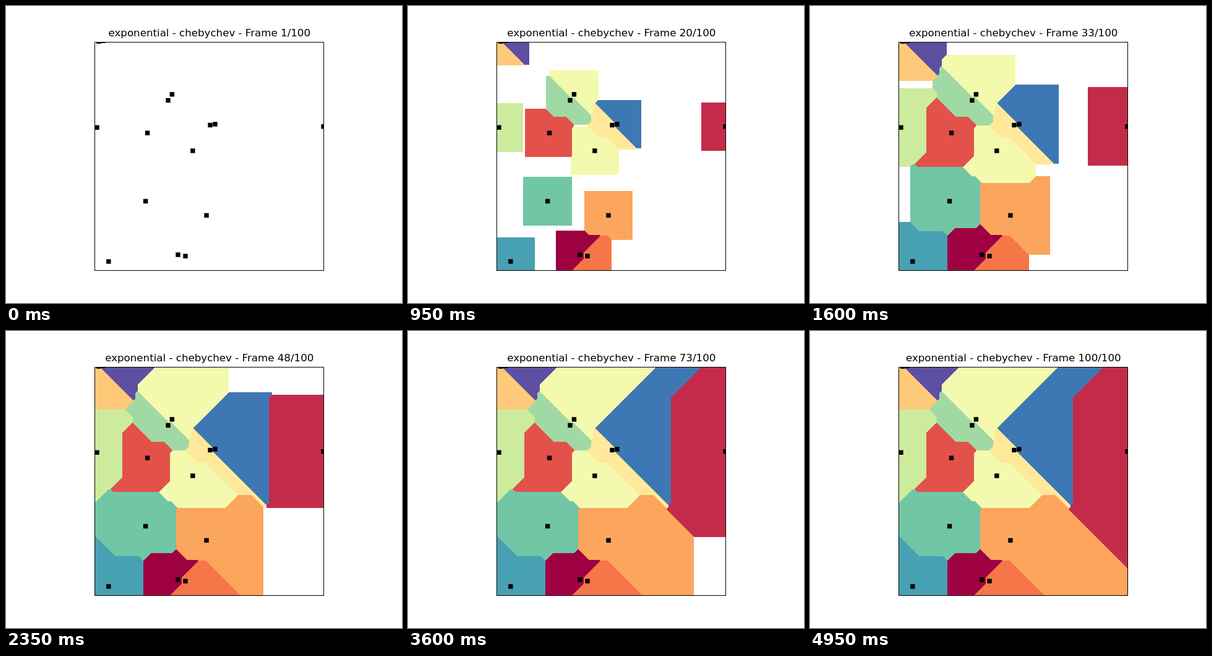
Animation of 640 by 480 pixels, one loop 5 s. Source, as an HTML page with a canvas:

```html
<!DOCTYPE html>
<html lang="en">
<head>
<meta charset="utf-8">
<title>Growing Chebyshev cells</title>
<style>
  html, body { margin: 0; width: 100%; height: 100%; overflow: hidden; background: #fff; }
  canvas, svg { position: absolute; left: 0; top: 0; display: block; }
  text { font: 16.667px "DejaVu Sans", sans-serif; text-anchor: middle; }
</style>
</head>
<body>
<canvas id="plot" width="640" height="480"></canvas>
<svg width="640" height="480"><text id="title" x="328.8" y="49"></text></svg>
<script>
const STEPS = 100, STEP_MS = 50;
const LEFT = 144, TOP = 59, W = 369, H = 368;
const MARK = 7.4;

// x, y, colour
const sites = [
  [278, 402, 0x9e0142],
  [513, 194.8, 0xc42b4b],
  [228.6, 205.2, 0xe2524a],
  [290, 404.2, 0xf57647],
  [324, 338.4, 0xfba55d],
  [149.8, 57.2, 0xfeca79],
  [330, 192.5, 0xfee99a],
  [268.4, 142.8, 0xf3f9ad],
  [301.8, 234, 0xf3f9ad],
  [147, 196.3, 0xcdeb9d],
  [262, 152.5, 0xa1d9a4],
  [225.6, 315.5, 0x70c6a5],
  [165.8, 412.9, 0x48a0b3],
  [338, 191, 0x3e78b4],
  [157, 56.2, 0x5e4fa2]
];

const ctx = document.getElementById("plot").getContext("2d");
const title = document.getElementById("title");
const image = ctx.createImageData(W, H);
const pixels = new Uint32Array(image.data.buffer);
const dist = new Float32Array(W * H);
const fill = new Uint32Array(W * H);

// RGB to the little-endian ABGR used by the pixel buffer
const abgr = c => (0xff000000 | (c & 255) << 16 | (c & 0xff00) | c >> 16) >>> 0;

// Nearest site and its Chebyshev distance for every pixel
for (let i = 0; i < W * H; i++) {
  const x = LEFT + i % W + 0.5, y = TOP + Math.floor(i / W) + 0.5;
  let best = Infinity, colour = 0;
  for (const [sx, sy, c] of sites) {
    const d = Math.max(Math.abs(x - sx), Math.abs(y - sy));
    if (d < best) { best = d; colour = c; }
  }
  dist[i] = best;
  fill[i] = abgr(colour);
}

function draw(step) {
  const radius = step ? 3.8 + 1.866 * step : 0;
  for (let i = 0; i < pixels.length; i++) {
    pixels[i] = dist[i] <= radius ? fill[i] : 0xffffffff;
  }
  ctx.clearRect(0, 0, 640, 480);
  ctx.putImageData(image, LEFT, TOP);

  ctx.save();
  ctx.beginPath();
  ctx.rect(LEFT, TOP - 1, W, H + 1);
  ctx.clip();
  ctx.fillStyle = "#000";
  for (const [x, y] of sites) ctx.fillRect(x - MARK / 2, y - MARK / 2, MARK, MARK);
  ctx.restore();

  ctx.strokeStyle = "#000";
  ctx.strokeRect(LEFT - 0.5, TOP - 0.5, W + 1, H + 1);
  title.textContent = `exponential - chebychev - Frame ${step + 1}/${STEPS}`;
}

let shown = -1;
const start = performance.now();
function tick() {
  const step = Math.floor((performance.now() - start) / STEP_MS) % STEPS;
  if (step !== shown) draw(shown = step);
  requestAnimationFrame(tick);
}
tick();
</script>
</body>
</html>
```
